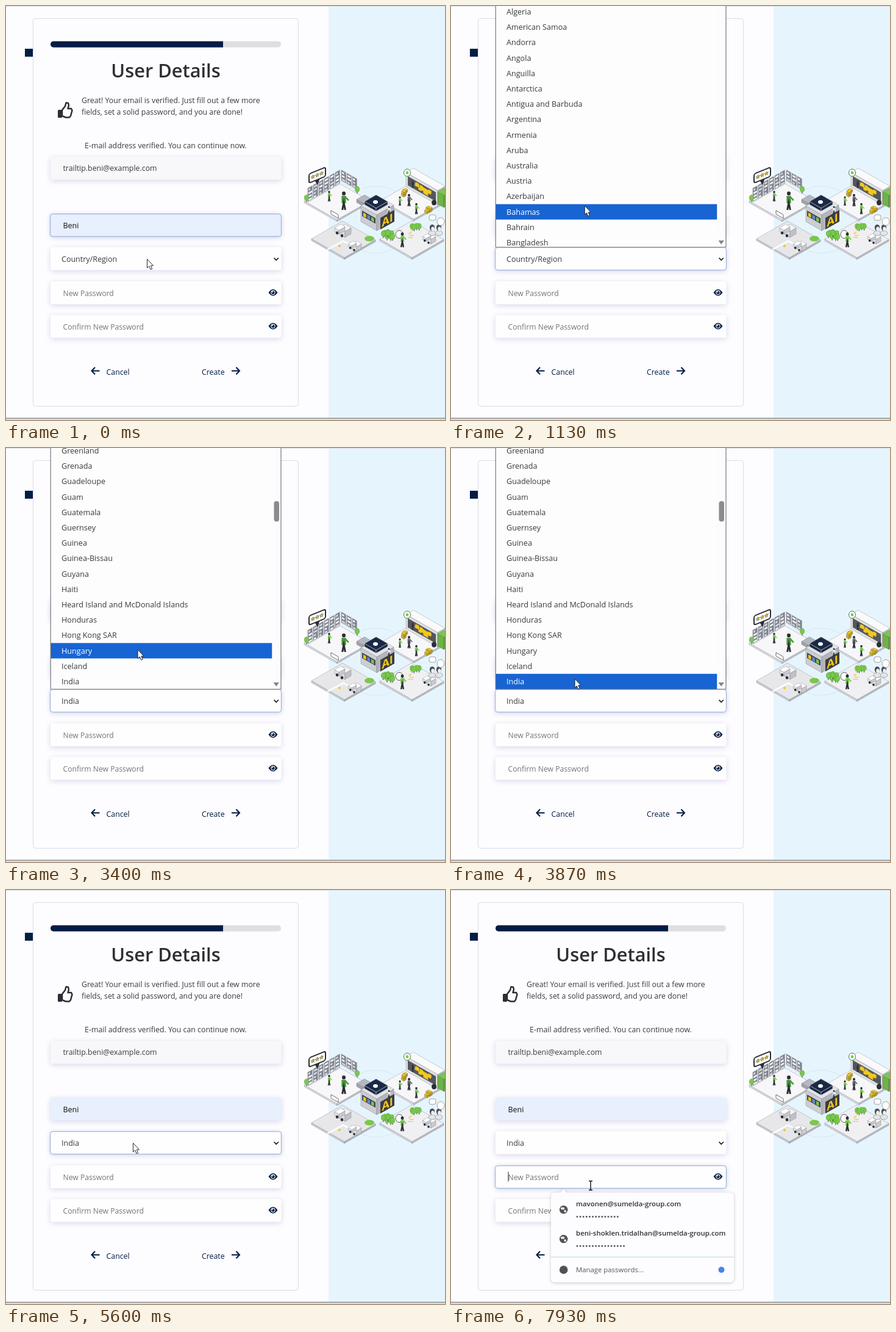
Animation, 720 px wide and 678 px high, one loop 8000 ms. Source, as an HTML page with a canvas:

```html
<!DOCTYPE html>
<html lang="en">
<head>
<meta charset="utf-8">
<title>User Details</title>
<style>
  html, body { margin: 0; width: 100%; height: 100%; overflow: hidden; background: #fdfcfe; }
  canvas { display: block; }
</style>
</head>
<body>
<canvas id="stage" width="720" height="678"></canvas>
<script>
const ctx = document.getElementById('stage').getContext('2d');
const LOOP = 8000, STEP = 1000 / 15, TAU = Math.PI * 2;
const NAVY = '#021d45', INK = '#3a3a3c', GREY = '#757577', PAPER = '#fdfcfe';
const GREEN = '#79c84c', YELLOW = '#f2c91d', DARK = '#2b2e36';
const ROW = 25.2, LIST_END = 395, SLOPE = 0.57;

const EARLY = ['Algeria', 'American Samoa', 'Andorra', 'Angola', 'Anguilla', 'Antarctica',
  'Antigua and Barbuda', 'Argentina', 'Armenia', 'Aruba', 'Australia', 'Austria',
  'Azerbaijan', 'Bahamas', 'Bahrain', 'Bangladesh'];
const LATER = ['Greece', 'Greenland', 'Grenada', 'Guadeloupe', 'Guam', 'Guatemala', 'Guernsey',
  'Guinea', 'Guinea-Bissau', 'Guyana', 'Haiti', 'Heard Island and McDonald Islands',
  'Honduras', 'Hong Kong SAR', 'Hungary', 'Iceland', 'India'];

// Moments of the interaction, in ms
const T = { open: 200, list: 260, typeI: 2195, typeN: 2460, hover: 3395, close: 4660, password: 7860 };

const START = { x: 231, y: 414 };
const MOVES = [
  { from: 933, to: 1400, x: 218, y: 321, ease: 5 },
  { from: 3333, to: 4067, x: 200, y: 387, ease: 1.5 },
  { from: 5467, to: 5600, x: 208, y: 414, ease: 1 },
  { from: 6200, to: 7133, x: 229, y: 484, ease: 1.4 }
];

// Each move eases out from wherever the last one ended
function pointer(t) {
  let { x, y } = START;
  for (const m of MOVES) {
    const p = Math.min(1, Math.max(0, (t - m.from) / (m.to - m.from)));
    const k = 1 - (1 - p) ** m.ease;
    x += (m.x - x) * k;
    y += (m.y - y) * k;
  }
  return [x, y];
}

function random(seed) {
  return () => (seed = seed * 16807 % 2147483647) / 2147483647;
}

// y is the middle of the capitals
function text(str, x, y, size = 12.35, color = INK, weight = 400, align = 'left') {
  ctx.font = `${weight} ${size}px "Open Sans", "Noto Sans", sans-serif`;
  ctx.textAlign = align;
  ctx.fillStyle = color;
  ctx.fillText(str, x, y + size * 0.36);
}

function paint(fill, stroke, width) {
  if (fill) { ctx.fillStyle = fill; ctx.fill(); }
  if (stroke) { ctx.strokeStyle = stroke; ctx.lineWidth = width; ctx.stroke(); }
}

function rect(x, y, w, h, fill) {
  ctx.fillStyle = fill;
  ctx.fillRect(x, y, w, h);
}

function round(x, y, w, h, r, fill, stroke, width = 1) {
  ctx.beginPath();
  ctx.roundRect(x, y, w, h, r);
  paint(fill, stroke, width);
}

function poly(pts, fill, stroke, width = 1) {
  ctx.beginPath();
  for (let i = 0; i < pts.length; i += 2) ctx.lineTo(pts[i], pts[i + 1]);
  ctx.closePath();
  paint(fill, stroke, width);
}

function line(pts, color, width = 1) {
  ctx.beginPath();
  for (let i = 0; i < pts.length; i += 2) ctx.lineTo(pts[i], pts[i + 1]);
  paint(null, color, width);
}

function oval(x, y, rx, ry, fill, stroke, width = 1) {
  ctx.beginPath();
  ctx.ellipse(x, y, rx, ry, 0, 0, TAU);
  paint(fill, stroke, width);
}

function withShadow(color, blur, dy, draw) {
  ctx.save();
  ctx.shadowColor = color;
  ctx.shadowBlur = blur;
  ctx.shadowOffsetY = dy;
  draw();
  ctx.restore();
}

// Isometric block; (x, y) is its lowest corner, w runs up right, d up left
function box(x, y, w, d, h, color, edge = 'rgba(70,75,90,.45)') {
  const left = [x, y, x - d, y - d * SLOPE, x - d, y - d * SLOPE - h, x, y - h];
  const right = [x, y, x + w, y - w * SLOPE, x + w, y - w * SLOPE - h, x, y - h];
  const top = [x, y - h, x + w, y - w * SLOPE - h, x + w - d, y - (w + d) * SLOPE - h, x - d, y - d * SLOPE - h];
  [[left, 0.12], [right, 0.24], [top, 0]].forEach(([pts, shade]) => {
    poly(pts, color);
    poly(pts, `rgba(30,34,45,${shade})`, edge, 0.6);
  });
}

// Upright isometric plane from its upper left corner; dir 1 falls to the right
function face(x, y, dir, draw) {
  ctx.save();
  ctx.transform(1, SLOPE * dir, 0, 1, x, y);
  draw();
  ctx.restore();
}

function shelves(x, y, dir, cols, h, rnd) {
  face(x, y, dir, () => {
    rect(0, 0, cols * 9, h, '#dcdee3');
    for (let c = 0; c < cols; c++) {
      rect(c * 9 + 1, 1, 7.5, h - 3, '#7f848e');
      for (let r = 3; r < h - 5; r += 5.5) rect(c * 9 + 2, r, 3 + rnd() * 3, 3, rnd() < 0.5 ? '#d3d6dc' : '#f1f2f5');
    }
  });
}

function person(x, y, h, shirt) {
  oval(x, y - h * 0.9, h * 0.1, h * 0.11, DARK);
  rect(x - h * 0.12, y - h * 0.77, h * 0.24, h * 0.4, shirt);
  line([x - h * 0.08, y, x, y - h * 0.4, x + h * 0.08, y], DARK, h * 0.1);
  line([x + h * 0.1, y - h * 0.7, x + h * 0.26, y - h * 0.52], shirt, h * 0.08);
}

// Scatters count copies of a drawing inside an ellipse
function scatter(count, x, y, rx, ry, rnd, draw) {
  for (let i = 0; i < count; i++) {
    const a = rnd() * TAU, r = Math.sqrt(rnd());
    draw(x + Math.cos(a) * rx * r, y + Math.sin(a) * ry * r);
  }
}

function tree(x, y) {
  line([x, y, x, y + 7], DARK);
  oval(x, y, 3.6, 4.5, GREEN, '#58a13b', 0.6);
}

function vehicle(x, y, size, color) {
  box(x, y, size, size, size, color);
  box(x - size, y - size * SLOPE, size, size * 0.7, size * 0.6, '#fff');
  [-0.5, -1.3].forEach(k => oval(x + size * k, y + size * k * SLOPE, size * 0.22, size * 0.26, DARK));
}

function star(x, y, r) {
  const pts = [];
  for (let k = 0; k < 10; k++) {
    const a = k * TAU / 10 - TAU / 4, len = k % 2 ? r * 0.45 : r;
    pts.push(x + Math.cos(a) * len, y + Math.sin(a) * len);
  }
  poly(pts, YELLOW, DARK, 0.5);
}

function store(rnd) {
  box(543, 353, 54, 54, 3, '#f7f7f9');
  shelves(494, 298, -1, 6, 25, rnd);
  shelves(549, 267, 1, 3, 20, rnd);
  box(586, 328, 13, 11, 5, '#b4b7bf');
  person(530, 320, 17, GREEN);
  person(554, 334, 30, '#47953c');
  face(533, 335, 1, () => round(0, 0, 12, 6, 1, '#fff', '#666'));
  tree(493, 314);
  tree(576, 300);
  face(497, 275, -0.72, () => {
    poly([9, 14, 14, 24, 18, 14], DARK);
    round(0, 0, 27, 15, 3, '#fff', DARK, 2);
    for (let i = 0; i < 3; i++) star(6.5 + i * 7, 7.5, 3.2);
  });
}

function depot(rnd) {
  box(669, 352, 54, 54, 3, '#f7f7f9');
  box(708, 326, 12, 52, 24, '#fafafb');
  face(656, 273, 1, () => {
    rect(3, 4, 46, 15, '#55575b');
    scatter(14, 29, 11, 14, 5, rnd, (x, y) => rect(x - 2.5, y - 2.5, 5, 5, YELLOW));
  });
  box(718, 330, 10, 10, 20, GREEN);
  oval(702, 322, 4, 4.5, DARK);
  oval(658, 273, 5.5, 6, '#fff', '#4a7d4a');
  oval(658, 273, 2.3, 2.5, GREEN);
  const parcel = (x, y) => box(x, y, 4, 4, 4, YELLOW);
  scatter(3, 652, 309, 5, 5, rnd, parcel);
  scatter(4, 692, 338, 7, 4, rnd, parcel);
  person(667, 298, 12, DARK);
  person(646, 327, 15, GREEN);
  person(661, 328, 20, '#62646b');
  person(673, 341, 18, GREEN);
}

function hub() {
  box(608, 368, 28, 26, 26, '#e3e5e9');
  box(607, 336, 19, 19, 5, '#1a2946', '#c9ccd3');
  oval(606, 321, 4, 3, '#fff');
  face(584, 335, 1, () => {
    rect(0, 0, 22, 9, '#41454e');
    [YELLOW, '#5d8ecb', GREEN].forEach((c, i) => rect(2 + i * 6.5, 2, 4.5, 6, c));
  });
  face(614, 347, -1, () => {
    rect(0, 0, 23, 19, '#3b3d42');
    text('AI', 11.5, 10, 18, YELLOW, 700, 'center');
  });
  person(628, 341, 13, '#fff');
}

function road() {
  box(555, 415, 51, 54, 3, '#e7e7ea');
  line([527, 399, 553, 385, 574, 396], '#fff', 2.5);
  vehicle(556, 379, 10, '#f4f4f6');
  vehicle(575, 402, 8, '#fff');
  oval(596, 381, 8, 4.5, GREEN);
  oval(547, 393, 2, 2, YELLOW);
}

function town(rnd) {
  box(666, 415, 52, 53, 3, '#f0f0f3');
  scatter(8, 627, 374, 10, 5, rnd, tree);
  scatter(4, 675, 360, 10, 3, rnd, tree);
  oval(645, 374, 6, 6.5, '#fff', '#555');
  person(650, 395, 24, GREEN);
  scatter(7, 661, 372, 5, 8, rnd, (x, y) => rect(x, y, 4, 1.2, YELLOW));
  vehicle(697, 390, 8, '#fff');
  for (const x of [699, 710]) {
    oval(x, 372, 6, 4, '#e3e5e9', '#777', 0.6);
    oval(x, 363, 4.2, 5.2, '#4a4d55');
    oval(x + 1, 365, 2.8, 3.5, '#eee');
  }
  round(694, 342, 11, 9, 3, '#fff', '#888', 0.8);
  oval(713, 353, 6, 6.5, '#fff', '#888', 0.8);
}

function page() {
  const rnd = random(41);
  rect(0, 0, 720, 678, PAPER);
  rect(529, 0, 191, 674, '#e6f5fd');
  rect(0, 0, 720, 1, '#dedde1');
  rect(0, 674, 720, 3, '#b3b2b5');
  rect(31, 70, 13, 13, NAVY);
  oval(607, 350, 58, 55, null, '#d5e2ea', 0.8);
  store(rnd);
  depot(rnd);
  road();
  town(rnd);
  hub();
  round(44.5, 20.5, 435, 635, 4, PAPER, '#dadbe8');
}

function thumb() {
  round(85, 170, 7, 13, 1.5, DARK);
  ctx.lineJoin = 'round';
  poly([92, 170.5, 97, 164, 98.5, 158.5, 102, 159, 103, 163, 101.5, 168,
    107, 168, 108.5, 171, 106, 180, 104, 182.5, 98, 182.5, 92, 180], null, DARK, 2.5);
  ctx.lineJoin = 'miter';
}

function field(y, fill, focus = 0) {
  withShadow('rgba(70,70,170,.2)', 9, 2, () => round(73, y, 378.5, 37.5, 4, fill));
  if (!focus) return;
  ctx.globalAlpha = focus;
  withShadow('rgba(90,130,220,.25)', 3, 0, () => round(72.5, y + 0.5, 379, 37, 4, null, '#9ab3da'));
  ctx.globalAlpha = 1;
}

function eye(y) {
  ctx.beginPath();
  ctx.moveTo(430.5, y);
  ctx.quadraticCurveTo(438, y - 10.5, 445.5, y);
  ctx.quadraticCurveTo(438, y + 10.5, 430.5, y);
  paint(NAVY);
  oval(438, y, 3.7, 3.7, PAPER);
  oval(438, y, 2.6, 2.6, NAVY);
  oval(437, y - 1, 1, 1, PAPER);
}

function arrow(x, y, dir) {
  line([x - 6.5 * dir, y, x + 6 * dir, y], NAVY, 2.1);
  line([x + dir, y - 5.8, x + 6.5 * dir, y, x + dir, y + 5.8], NAVY, 2.1);
}

function form(t, country) {
  const opened = Math.min(1, Math.max(0, (t - T.open + STEP) / 150));
  const onPassword = t >= T.password;
  round(73, 57.7, 378, 10, 5, '#dfdee2');
  round(73, 57.7, 283, 10, [5, 0, 0, 5], NAVY);
  text('User Details', 262, 106, 30.8, '#2f2f31', 600, 'center');
  thumb();
  text('Great! Your email is verified. Just fill out a few more', 124, 155);
  text('fields, set a solid password, and you are done!', 124, 173.5);
  text('E-mail address verified. You can continue now.', 262, 229, 12.35, INK, 400, 'center');
  field(247, '#f8f7f9');
  text('trailtip.beni@example.com', 93.5, 266);

  const rows = [
    { label: 'Beni', x: 93.5, color: '#111', fill: '#e8f0fd', focus: 1 - opened },
    { label: country, x: 91, color: INK, focus: onPassword ? 0 : opened },
    { label: 'New Password', x: 93.5, color: GREY, focus: +onPassword, secret: true },
    { label: 'Confirm New Password', x: 93.5, color: GREY, secret: true }
  ];
  rows.forEach(({ label, x, color, fill = '#fefefe', focus, secret }, i) => {
    const y = 340 + Math.round(i * 55.4);
    field(y, fill, focus);
    text(label, x, y + 19.2, secret ? 12.2 : 12.5, color);
    if (secret) eye(y + 18.3);
  });
  line([439.5, 412.5, 443.2, 416.2, 447, 412.5], '#222', 1.7);

  arrow(147, 597.5, -1);
  text('Cancel', 164.5, 600, 12.35, NAVY);
  text('Create', 321, 600, 12.35, NAVY);
  arrow(376.5, 597.5, 1);
}

function dropdown(t, mouseY) {
  const late = t >= T.typeI, india = t >= T.typeN;
  const names = late ? LATER : EARLY;
  const first = !late ? 9.5 : india ? 4.4 - ROW : 4.4;
  let active = mouseY < LIST_END ? Math.round((mouseY - first) / ROW) : -1;
  if (late && t < T.hover) active = india ? 16 : 15;

  ctx.save();
  ctx.beginPath();
  ctx.rect(72, 0, 380, LIST_END + 1);
  ctx.clip();
  rect(73, 0, 378, LIST_END, '#fefdfe');
  names.forEach((name, i) => {
    const y = first + i * ROW, on = i === active;
    if (on) rect(73, y - ROW / 2, 363.5, ROW, '#1764d2');
    text(name, 91, y, 12.6, on ? '#fff' : INK);
  });
  rect(436.5, 0, 14.5, LIST_END, '#fcfbfd');
  if (late) round(439.5, india ? 87 : 85.5, 8.5, 33.5, 4, '#8b8a8c');
  poly([438.5, 384, 448, 384, 443.2, 390.5], '#858487');
  line([73.2, 0, 73.2, LIST_END, 451, LIST_END, 451, 0], '#77777c', 1.2);
  ctx.restore();
}

function globe(x, y) {
  oval(x, y, 6.8, 6.8, '#505155');
  oval(x - 1.5, y - 2, 3.2, 2, '#e8e8ea');
  oval(x + 2.5, y + 2.5, 2, 2, '#e8e8ea');
}

function suggestions() {
  const tip = [178, 497, 184.5, 490.5, 191, 497];
  withShadow('rgba(0,0,0,.22)', 5, 1, () => {
    poly(tip, PAPER);
    round(164, 495.5, 300, 147, 6, PAPER);
  });
  poly(tip, PAPER);
  ['mavonen@sumelda-group.com', 'beni-shoklen.tridalhan@sumelda-group.com'].forEach((name, i) => {
    const y = 514 + i * 48;
    globe(184.7, y + 9.5);
    text(name, 205, y, 11.45, '#2f3034', 600);
    for (let k = 0; k < 14 + i * 2; k++) oval(207 + k * 5.1, y + 21, 1.5, 1.5, '#55565a');
  });
  rect(164, 600.5, 300, 1.2, '#c3dcea');
  oval(184.7, 622, 6.8, 6.8, '#505155');
  text('Manage passwords...', 205, 622, 11.35, '#55565a');
  oval(443.5, 622, 5, 5, '#4285f4');
  rect(93.5, 461.5, 1, 16, '#222');
}

function cursor(x, y) {
  ctx.save();
  ctx.translate(x, y);
  if (y > 451) {
    rect(-0.7, -7, 1.4, 14, '#151515');
    for (const end of [-7.5, 7.5]) line([-3, end, -1, end, 0, end * 0.87, 1, end, 3, end], '#151515', 1.4);
  } else {
    poly([0.5, 0.5, 0.5, 15, 3.8, 12, 6, 17.5, 8.6, 16.4, 6.3, 11.2, 10.5, 11.2], '#fff', '#2a2a2c');
  }
  ctx.restore();
}

function draw(t) {
  const [x, y] = pointer(t);
  const country = t < T.typeI ? 'Country/Region' : t < T.typeN ? 'Iceland' : 'India';
  page();
  form(t, country);
  if (t >= T.list && t < T.close) dropdown(t, y);
  if (t >= T.password) suggestions();
  cursor(x, y);
}

// The picture advances at fifteen steps a second
function tick() {
  const t = performance.now() % LOOP;
  draw(Math.floor((t + 5) / STEP) * STEP);
  requestAnimationFrame(tick);
}
tick();
</script>
</body>
</html>
```
